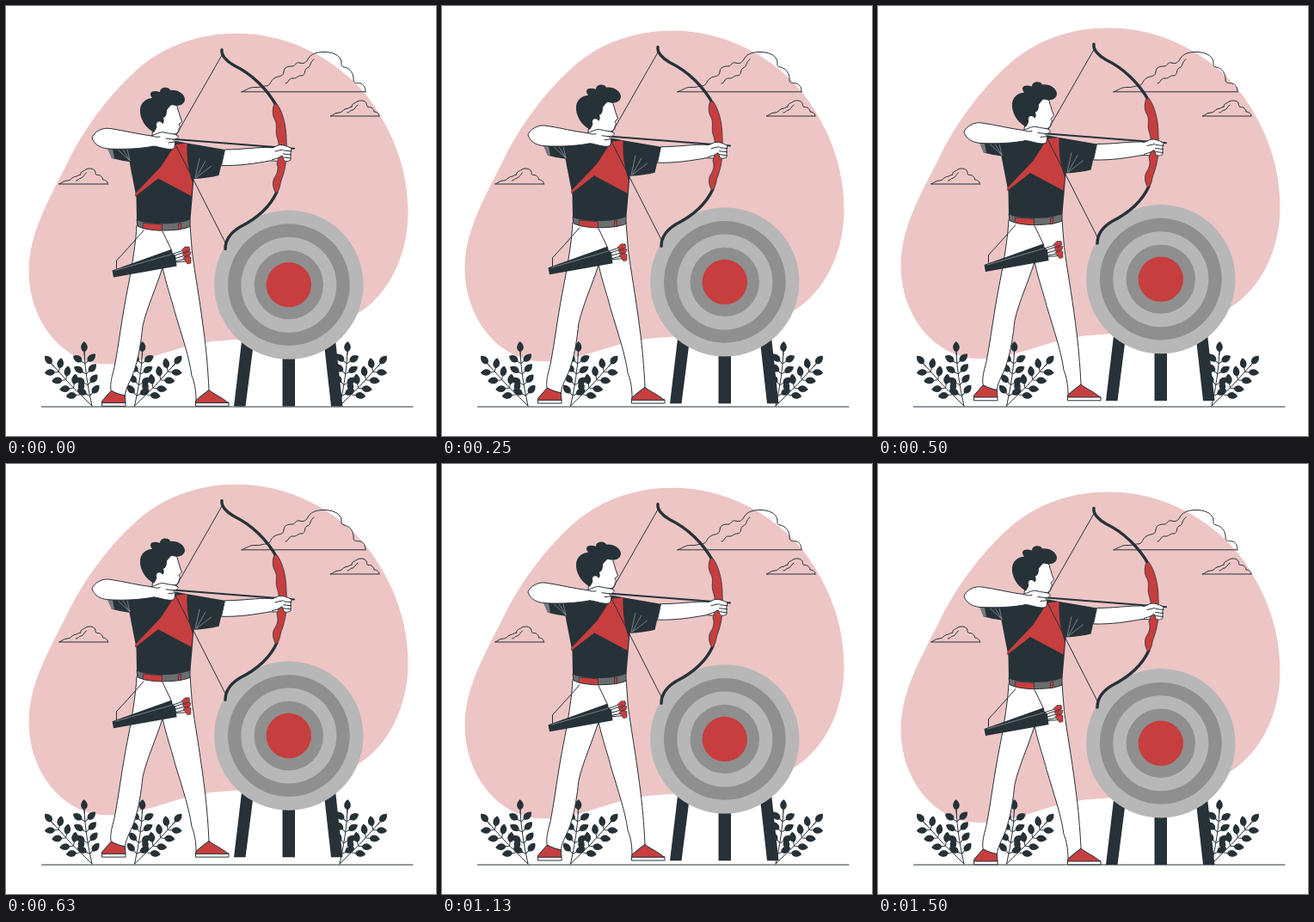
Recreate the animation shown at these times as an HTML page. Size 500 by 500 pixels, loop 1540 ms.

```html
<!DOCTYPE html>
<html lang="en">
<head>
<meta charset="utf-8">
<title>Archer</title>
<style>
  html, body { margin: 0; width: 100%; height: 100%; overflow: hidden; background: #fff; }
  svg { display: block; width: 100%; height: 100%; }
  .line { fill: none; stroke: #263238; stroke-width: 1; stroke-linejoin: round; stroke-linecap: round; }
  .skin { fill: #fff; stroke: #263238; stroke-width: 1; stroke-linejoin: round; }
  .dark { fill: #263238; }
  .red { fill: #c73e3e; }
  .edged { stroke: #263238; stroke-width: 1; stroke-linejoin: round; }
  .fold { fill: none; stroke: #9a9fa2; stroke-width: .7; }
</style>
</head>
<body>
<svg viewBox="0 0 500 500">
  <defs>
    <path id="leaf" class="dark" d="M-4.500-.4L0-.5C2-5 8-5.500 12 0C8 5 2 4.500 0 .5L-4.500 .4Z"/>
    <g id="plant"></g>
    <path id="cloud" class="line" d="M434 128H377C381 127 382 124 387 124C391 124 391 121 395 119.500C398 120 399 117 402 117.500C402 113 406 113 407 112C411 108.500 418 110 419 113C420 115 419 117 421 117.500C425 117 428 120 428 123C431 123 434 125 434 128M397 124C400 124 400 121 403 121C406 120 406 117 409 115"/>
  </defs>

  <path class="float" fill="#edc5c5" d="M268 32C330 32 385 62 420 105C450 145 467.500 190 467.500 240C467.500 290 445 335 410 357C360 388 290 385 240 390C190 397 160 416.500 118 416.500C65 416.500 26.500 365 26.500 308C26.500 260 56 215 75 175C93 140 122 100 157 70C188 45 225 32 268 32Z"/>

  <path class="line" d="M418 99.800H273.500C280 98 283 94 290 94.500C296 95 298 93 302 93C308 93 307 87 312 84C316 81 322 83 323 77C323 71 328 70 333 70C337 70 336 65 341 66C347 68 349 65 351 62C354 56 360 54 368 53.500C379 53 389 57 390 65C390 68 389 70 393 71C400 72 405 79 404 87C406 91 409 89 412 90C416 91 418 95 418 99.800M325 90C329 90 328 84 333 84C338 85 340 80 344 81C349 80 346 75 350 72C355 71 353 65 358 62"/>
  <use href="#cloud"/>
  <use href="#cloud" x="-315.500" y="79"/>

  <use href="#plant" transform="translate(149.500 465)"/>
  <use href="#plant" transform="translate(388 465)"/>
  <use href="#plant" transform="translate(100 465) scale(-1 1)"/>
  <path class="line" d="M41.500 466H473"/>

  <g class="float">
    <!-- target -->
    <path class="dark" d="M274 390L287.500 395L278.500 465.500H265ZM321.500 405H336V465.500H321.500ZM370 394L383 388L391.500 465.500H378Z"/>
    <g transform="translate(328.800 324.200)">
      <circle r="86.700" fill="#b7b7b7"/>
      <circle r="70.800" fill="#8f8f8f"/>
      <circle r="55.500" fill="#b7b7b7"/>
      <circle r="40.200" fill="#8f8f8f"/>
      <circle r="26.200" class="red"/>
    </g>

    <!-- shoes and trousers -->
    <path class="skin" d="M111.500 461H139V465.300H111.500ZM220.500 461H259V465.300H220.500Z"/>
    <path class="red edged" d="M122 447.500L138.500 453.500L139 461.500H111.500V459.500ZM236 446.500C241 451 251 455 258.500 461.500H220.500V459Z"/>
    <path class="skin" d="M152 255C151 275 147 300 142 326C135 360 131 395 126 420C123 432 121 438 122 447C127 450 133 452 138.500 453C139 443 147 433 150 421C155 405 157 390 159 372C164 350 175 327 182 304C188 330 193 342 196 355C205 385 213 408 216 430C219 437 221 447 221 458.500C226 454 231 450 236 446.500C235 425 233 400 229.500 375C225 340 219.500 310 216.500 287L214 255Z"/>
    <path class="line" d="M182 304V291"/>

    <!-- belt -->
    <path fill="#6b6d6f" class="edged" d="M152 248L153 256C165 262.300 200 262.800 214 256.500V247Z"/>
    <path class="red edged" style="stroke-width:.7" d="M159.500 252.500L181.500 254V261.200C173 261 166 260 159 258.500ZM200.500 253L203.500 252.500V259.800L200.500 260.200Z"/>

    <!-- quiver -->
    <path class="line" d="M160 261Q139 285 128.500 296V306M182 262L193 285"/>
    <path class="skin" d="M192 289L210 283V297L197 298Z"/>
    <path class="line" d="M194 291L208 286M195 294L209 290M196 297L210 294"/>
    <path class="red edged" style="stroke-width:.6" d="M204 284L208 280L213 280L214 284L208 288ZM205 288L210 285L215 286L214 290L208 292ZM206 293L210 290L215 292L215 299L211 300Z"/>
    <path class="dark" d="M123.500 307.500L192 283L194 288L197 290L198.500 302.500L125 315.500Z"/>
    <path class="fold" d="M127 307.500L193 288.500"/>

    <!-- head -->
    <path class="skin" d="M172 120L197 112C200 118 201 126 204.500 134C204 136 201 136 201 138C203 140 202 142 201 143C202 148 197 150 190 149L187 158L168 166L171 142Z"/>
    <path class="dark" d="M172 147C162 142 155 130 156 120C157 112 162 108 170 107C165 101 170 97 179 100C179 94 189 93 191 98C199 97 208 102 208 109C207 116 199 117 193 115C190 116 189 119 187 121C187 126 186 129 183 130C184 133 184 136 182 137C180 133 174 134 175 139C176 141 174 144 172 147Z"/>

    <!-- shirt -->
    <path class="dark" d="M118 165L123 177Q134 180 143.500 181C146 195 150 214 151.500 223L152 249C168 255 200 255 214.500 248L218.500 201Q235 200 247.500 197L254.500 167L211 159.500L198 157L168 160L140 164Z"/>
    <path class="red" d="M197 161L210.500 159.500C210 178 212 190 217 206L215.500 221L177 200.500L150 221.500V218.500L180 187Z"/>
    <path class="fold" d="M220 200L225 177M221 200L232 180M222 199L239 186M144 180L130 167M144 180L136 167M144 180L141 167"/>
    <path fill="#777b7e" d="M118 166H124L126 177L123 177Z"/>

    <!-- bow -->
    <path class="line" d="M252 55.500L194.500 156L256 277"/>
    <path class="skin" d="M254.500 167C275 167 292 164 307 164.500C312 165 316 162 320 162L324 179C317 181 312 180 307 180C290 183 272 186 250.500 185.500Z"/>
    <path class="line" style="stroke-width:3.400" d="M251 51C250 57 256 64 265 69C286 79 304 97 315 117M315 216C306 236 290 248 272 257C259 265 255 273 255 282.500"/>
    <path class="red edged" style="stroke-width:.8" d="M312 114C309 121 310 128 313 133C316 139 313 146 315 152C318 160 319 172 315 183C317 189 316 194 312 200C309 206 311 213 314 218C319 213 318 209 320 203C326 188 327 172 326 156C326 140 322 123 315 114Z"/>
    <path class="line" style="stroke-width:2" d="M197 155L335 165.700"/>
    <path class="skin" d="M308 165C313 165 315 161 321 161.500C326 163 330 164 332 166L331 170L331 179C328 181 324 181 323 179L321 174L316 177L309 179"/>
    <path class="line" d="M323 168L332 169M322.500 172L331.500 173M322.500 176L331 177M313 169L322 167"/>

    <!-- drawing arm -->
    <path class="skin" d="M100 153C103 146 112 141 121 142.500C138 145 153 149 169 151C175 149 179 146 184 147C190 149 196 148 200 151C201 154 197 155 194 155L197 158C196 161 197 163 195 166C188 168 180 164 172 163C157 166 138 167 119 166C108 165 102 160 100 153Z"/>
    <path class="line" d="M169 151C173 152 176 153 179 152M194 155L186 154M197 158L189 159"/>
  </g>
</svg>
<script>
const LOOP = 1540, LEAD = 40, RISE = 10;

// Leafy twig along a quadratic curve from (0,0) to the tip.
function twig(cx, cy, x, y, pairs) {
  const leaf = (t, turn) => {
    const a = 2 * t * (1 - t), b = t * t;
    const dir = Math.atan2((1 - 2 * t) * cy + t * y, (1 - 2 * t) * cx + t * x) * 180 / Math.PI;
    const stalk = turn ? 4.5 : 0;
    return `<use href="#leaf" transform="translate(${a * cx + b * x} ${a * cy + b * y}) rotate(${dir + turn}) translate(${stalk})"/>`;
  };
  return `<path class="line" d="M0 0Q${cx} ${cy} ${x} ${y}"/>` + leaf(1, 0) +
    pairs.map(t => leaf(t, -52) + leaf(t, 52)).join('');
}
document.getElementById('plant').innerHTML =
  twig(8, -35, 9, -63, [.17, .36, .56, .76]) +
  twig(24, -22, 47, -49, [.29, .45, .64, .82]);

const floats = document.querySelectorAll('.float');
function draw(now) {
  const phase = (now + LEAD) % LOOP / LOOP;
  const lift = RISE * (1 - Math.abs(1 - 2 * phase));
  floats.forEach(el => el.setAttribute('transform', `translate(0 ${.5 - lift})`));
}
const start = performance.now();
function tick() {
  draw(performance.now() - start);
  requestAnimationFrame(tick);
}
tick();
</script>
</body>
</html>
```
